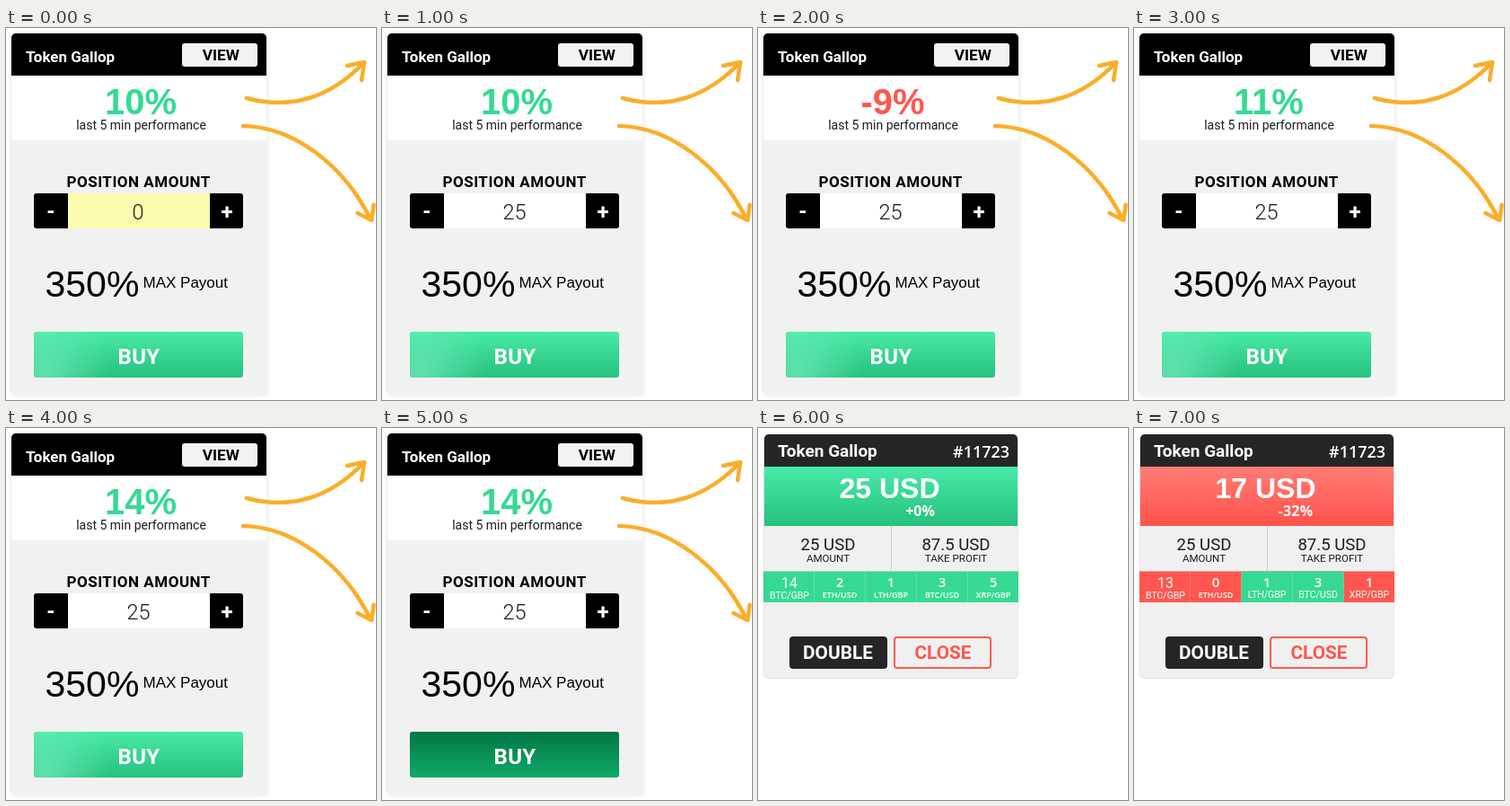
Write an HTML page that moves like this. It is 412 by 414 pixels and loops after 8000 ms.

```html
<!DOCTYPE html>
<html lang="en">
<head>
<meta charset="utf-8">
<title>Position card</title>
<style>
html, body { margin: 0; width: 100%; height: 100%; overflow: hidden; background: #fff; }
svg { display: block; width: 100vw; height: 100vh; }
text { font-family: Roboto, sans-serif; fill: #1c1c1c; text-anchor: middle; }
.arial { font-family: "Liberation Sans", Arial, sans-serif; }
.open { font-family: "Open Sans", sans-serif; font-weight: 600; }
.b { font-weight: 700; }
.start { text-anchor: start; }
.light { fill: #fff; }
.black { fill: #000; }
.up { fill: #36d993; }
.down { fill: #ff574f; }
.perf { font-size: 40px; }
.amount { font-size: 23.5px; font-weight: 300; }
.stat { font-size: 18.6px; }
.label { font-size: 11.6px; }
.usd { font-size: 32px; }
.count { font-size: 15px; }
.count1 { font-size: 16px; }
.pair { font-size: 9px; }
.wide { font-size: 10.5px; }

/* hard switches inside an 8 s loop, one step per second */
.on { opacity: 0; animation: 8s step-end infinite; }
.s0-1 { animation-name: s0-1; }
.s0-2 { animation-name: s0-2; }
.s0-5 { animation-name: s0-5; }
.s0-6 { animation-name: s0-6; }
.s1-6 { animation-name: s1-6; }
.s2-3 { animation-name: s2-3; }
.s3-4 { animation-name: s3-4; }
.s4-6 { animation-name: s4-6; }
.s5-6 { animation-name: s5-6; }
.s6-7 { animation-name: s6-7; }
.s6-8 { animation-name: s6-8; }
.s7-8 { animation-name: s7-8; }
@keyframes s0-1 { 0% { opacity: 1 } 12.5% { opacity: 0 } }
@keyframes s0-2 { 0% { opacity: 1 } 25% { opacity: 0 } }
@keyframes s0-5 { 0% { opacity: 1 } 62.5% { opacity: 0 } }
@keyframes s0-6 { 0% { opacity: 1 } 75% { opacity: 0 } }
@keyframes s1-6 { 12.5% { opacity: 1 } 75% { opacity: 0 } }
@keyframes s2-3 { 25% { opacity: 1 } 37.5% { opacity: 0 } }
@keyframes s3-4 { 37.5% { opacity: 1 } 50% { opacity: 0 } }
@keyframes s4-6 { 50% { opacity: 1 } 75% { opacity: 0 } }
@keyframes s5-6 { 62.5% { opacity: 1 } 75% { opacity: 0 } }
@keyframes s6-7 { 75% { opacity: 1 } 87.5% { opacity: 0 } }
@keyframes s6-8 { 75% { opacity: 1 } }
@keyframes s7-8 { 87.5% { opacity: 1 } }
</style>
</head>
<body>
<svg viewBox="0 0 412 414" preserveAspectRatio="none">
  <defs>
    <linearGradient id="green" x2="0" y2="1">
      <stop stop-color="#48eba7"/><stop offset="1" stop-color="#27c07f"/>
    </linearGradient>
    <linearGradient id="dark" x2="0" y2="1">
      <stop stop-color="#007643"/><stop offset="1" stop-color="#11a96a"/>
    </linearGradient>
    <linearGradient id="red" x2="0" y2="1">
      <stop stop-color="#ff7d76"/><stop offset="1" stop-color="#ff524a"/>
    </linearGradient>
    <radialGradient id="glow" gradientUnits="userSpaceOnUse" cx="42" cy="384" r="75">
      <stop stop-color="#7df0c4" stop-opacity=".65"/><stop offset="1" stop-color="#7df0c4" stop-opacity="0"/>
    </radialGradient>
    <filter id="shadow" x="-5%" y="-5%" width="110%" height="110%">
      <feDropShadow dx="0" dy="0" stdDeviation="2" flood-opacity=".16"/>
    </filter>
  </defs>

  <!-- order form -->
  <g class="on s0-6">
    <rect x="6" y="6" width="284.500" height="402.500" rx="5" fill="#f1f1f1" filter="url(#shadow)"/>
    <path d="M6 53V11a5 5 0 0 1 5-5H285a5 5 0 0 1 5 5V53z"/>
    <path d="M6 53H290V125H6z" fill="#fff"/>
    <text class="b light start" x="22" y="38" font-size="17">Token Gallop</text>
    <rect x="196" y="17" width="84" height="26" rx="3" fill="#f2f1f3"/>
    <text class="b black" x="239.300" y="36" font-size="17.300">VIEW</text>

    <text class="arial b perf up on s0-2" x="150" y="96">10%</text>
    <text class="arial b perf down on s2-3" x="150" y="96">-9%</text>
    <text class="arial b perf up on s3-4" x="150" y="96">11%</text>
    <text class="arial b perf up on s4-6" x="150" y="96">14%</text>
    <text x="150.500" y="113" font-size="14">last 5 min performance</text>

    <text class="b black" x="147.700" y="177" font-size="17" letter-spacing=".5">POSITION AMOUNT</text>
    <rect x="31" y="184" width="233" height="39" rx="3"/>
    <g class="on s0-1">
      <path d="M69 184H227V223H69z" fill="#fafcae"/>
      <text class="amount" x="147" y="212.500">0</text>
    </g>
    <g class="on s1-6">
      <path d="M69 184H227V223H69z" fill="#fff"/>
      <text class="amount" x="147.500" y="212.500">25</text>
    </g>
    <text class="b light" x="50" y="212" font-size="24">-</text>
    <text class="b light" x="246" y="212.500" font-size="24">+</text>

    <text class="arial black start" x="43.500" y="299" font-size="41">350%</text>
    <text class="arial black start" x="152.500" y="289" font-size="17">MAX Payout</text>

    <g class="on s0-5">
      <rect x="31" y="338" width="233" height="51" rx="3" fill="url(#green)"/>
      <rect x="31" y="338" width="233" height="51" rx="3" fill="url(#glow)"/>
    </g>
    <rect class="on s5-6" x="31" y="338" width="233" height="51" rx="3" fill="url(#dark)"/>
    <text class="b light" x="148" y="374" font-size="24" letter-spacing=".3">BUY</text>

    <g fill="none" stroke="#fbae29" stroke-width="4.600" stroke-linecap="round" stroke-linejoin="round">
      <path d="M268 78C318 92 362 76 397 40M380 42L399 38L396 58"/>
      <path d="M264 109C320 110 376 152 406 213M391.500 206L407 214L409.500 197"/>
    </g>
  </g>

  <!-- open position -->
  <g class="on s6-8">
    <rect x="6.500" y="7.500" width="283" height="271" rx="5" fill="#f0f0f0" stroke="#e4e4e4"/>
    <path d="M7 43V12a5 5 0 0 1 5-5H284a5 5 0 0 1 5 5V43z" fill="#252525"/>
    <text class="b light start" x="22" y="32" font-size="19">Token Gallop</text>
    <text class="open light" x="248.500" y="33" font-size="18">#11723</text>

    <path d="M148.500 109V159" stroke="#ccc"/>
    <text class="stat" x="78" y="136">25 USD</text>
    <text class="label" x="78" y="149">AMOUNT</text>
    <text class="stat" x="220.500" y="136">87.5 USD</text>
    <text class="label" x="220.500" y="149">TAKE PROFIT</text>

    <g class="on s6-7">
      <path d="M7 43H289V109H7z" fill="url(#green)"/>
      <text class="arial b usd light" x="146.500" y="78">25 USD</text>
      <text class="open b light" x="180.500" y="98" font-size="16">+0%</text>
      <path class="up" d="M6 159.500H290V194H6z"/>
      <text class="count1 light" x="35" y="178">14</text>
      <text class="wide light" x="35" y="190">BTC/GBP</text>
      <text class="open count light" x="91" y="177">2</text>
      <text class="open pair light" x="91" y="189">ETH/USD</text>
      <text class="open count light" x="148" y="177">1</text>
      <text class="open pair light" x="148" y="189">LTH/GBP</text>
      <text class="open count light" x="205" y="177">3</text>
      <text class="open pair light" x="205" y="189">BTC/USD</text>
      <text class="open count light" x="262" y="177">5</text>
      <text class="open pair light" x="262" y="189">XRP/GBP</text>
    </g>

    <g class="on s7-8">
      <path d="M7 43H289V109H7z" fill="url(#red)"/>
      <text class="arial b usd light" x="146.500" y="78">17 USD</text>
      <text class="open b light" x="180" y="98" font-size="16" letter-spacing=".3">-32%</text>
      <path class="down" d="M6 159.500H290V194H6z"/>
      <path class="up" d="M119.500 159.500H233.500V194H119.500z"/>
      <text class="count1 light" x="35" y="178">13</text>
      <text class="wide light" x="35" y="190">BTC/GBP</text>
      <text class="open count light" x="91" y="177">0</text>
      <text class="open pair light" x="91" y="189">ETH/USD</text>
      <text class="open count light" x="148" y="177">1</text>
      <text class="wide light" x="148" y="189">LTH/GBP</text>
      <text class="open count light" x="205" y="177">3</text>
      <text class="wide light" x="205" y="189">BTC/USD</text>
      <text class="open count light" x="262" y="177">1</text>
      <text class="wide light" x="262" y="189">XRP/GBP</text>
    </g>
    <path d="M62.500 160V194M119.500 160V194M176.500 160V194M233.500 160V194" stroke="#fff" stroke-opacity=".2"/>

    <rect x="35" y="232" width="109" height="36" rx="4" fill="#252525"/>
    <text class="b light" x="89" y="257" font-size="20.800">DOUBLE</text>
    <rect x="152" y="233" width="107" height="34" rx="3" fill="none" stroke="#ff584f" stroke-width="2"/>
    <text class="b down" x="206" y="257" font-size="20.800">CLOSE</text>
  </g>
</svg>
</body>
</html>
```
